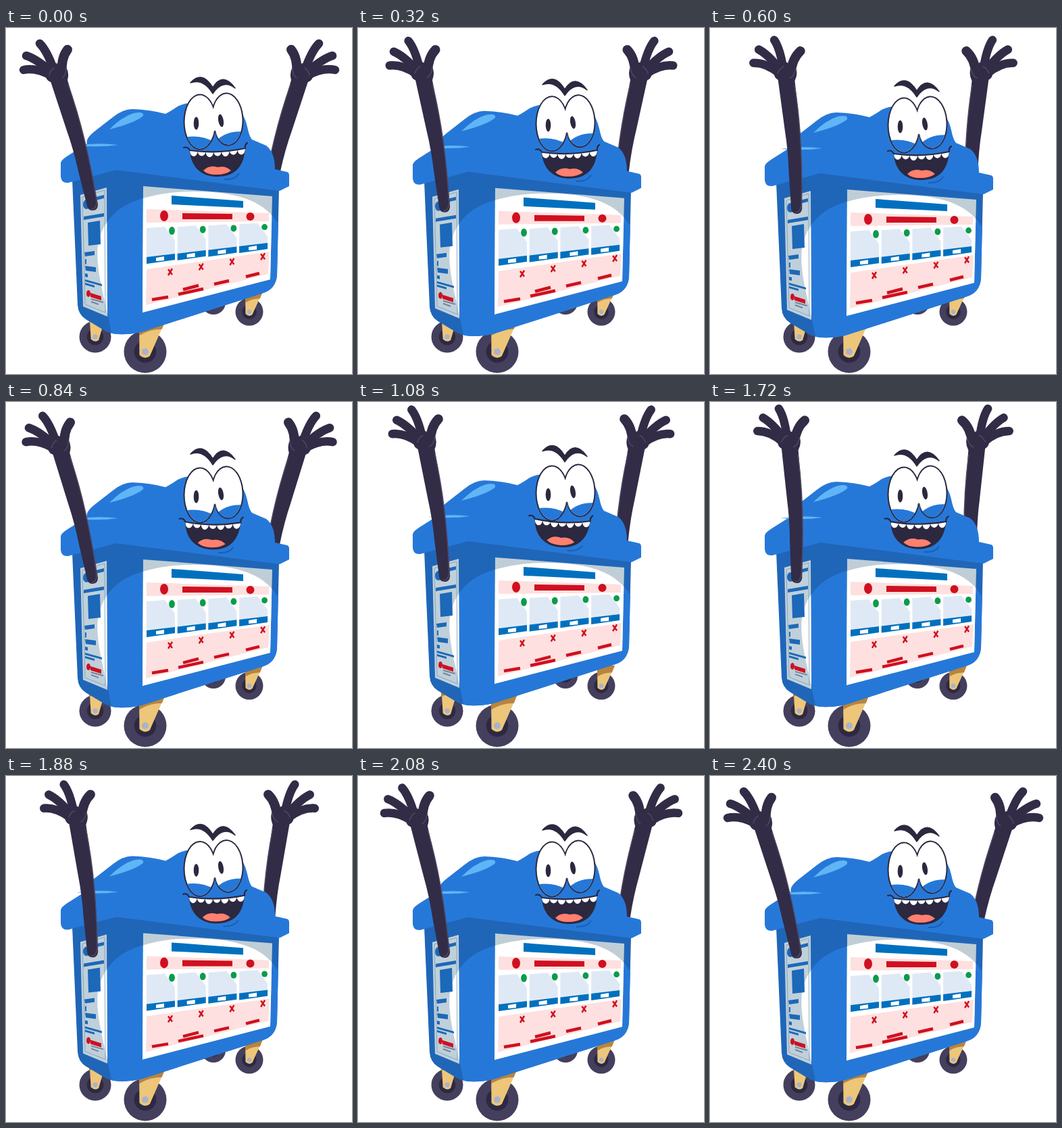
An HTML page for the animation above (2440 ms loop, 512x512 px).

```html
<!DOCTYPE html>
<html lang="en">
<head>
<meta charset="utf-8">
<style>
  html, body { margin: 0; width: 100%; height: 100%; overflow: hidden; background: #fff; }
  svg { display: block; width: 100vw; height: 100vh; }
</style>
</head>
<body>
<svg viewBox="0 0 512 512">
  <defs>
    <clipPath id="light"><path d="M158 462C150 412 129 352 137 316C144 286 165 262 203 252C226 245 250 242 278 242C340 242 386 255 405 295V462Z"/></clipPath>
    <clipPath id="eyeClip"><ellipse cx="287" cy="139" rx="22.500" ry="39.500"/><ellipse cx="327.500" cy="135" rx="22" ry="37.500" transform="rotate(-3 327 135)"/></clipPath>
    <path id="mouthShape" d="M272 181Q312 187 354 178C352 206 338 220 312 220C288 220 273 204 272 181Z"/>
    <clipPath id="mouthClip"><use href="#mouthShape"/></clipPath>
    <path id="bodyShape" d="M98 224L106 410Q107 424 118 431L148 449Q166 457 200 450L381 392Q399 386 401 366L404 238L163 205Z"/>
    <path id="frontPoster" d="M203 234L394 249L391 372L202 421Z"/>
    <path id="sidePoster" d="M110 247L149 236L150 427L114 412Z"/>

    <g id="arm">
      <path d="M120 263L107 212Q100 180 90 152L66 79L59 73Q62 55 74 52L89 58Q94 66 91 77L105 124Q122 184 136 261Q136 270 128 270Q121 270 120 263Z" fill="#322c47"/>
      <g fill="none" stroke="#322c47" stroke-width="12.500" stroke-linecap="round" stroke-linejoin="round">
        <path d="M26 62Q44 58 66 70"/>
        <path d="M30 41Q46 46 68 66"/>
        <path d="M50 23Q61 34 71 63"/>
        <path d="M91 32Q81 45 83 67" stroke-width="14"/>
        <path d="M68 71L79 65" stroke-width="18"/>
      </g>
      <path d="M92 84Q119 160 134 256Q134 268 127 268M64 70Q66 62 71 59M83 74Q89 70 89 59" fill="none" stroke="#514661" stroke-width="1.500" stroke-linecap="round"/>
    </g>
  </defs>

  <g id="wheels"></g>
  <g id="rightArm"><g transform="matrix(-1 0 0 1 513 0)"><use class="swing" href="#arm"/></g></g>

  <g id="bin">
    <use href="#bodyShape" fill="#1f66b8"/>
    <use href="#bodyShape" fill="#2678d8" clip-path="url(#light)"/>

    <use href="#sidePoster" fill="#bfd0da"/>
    <use href="#sidePoster" fill="#fff" clip-path="url(#light)"/>
    <path d="M113 250L146 240L147 421L117 409Z" fill="none" stroke="#7c9ab4" stroke-width=".8"/>
    <g fill="#1c68b9">
      <ellipse cx="119" cy="261" rx="5" ry="7"/>
      <path d="M115 279L145 274V279L115 284ZM121 288L139 285L140 320L122 322ZM133 250L145 247V252L133 255ZM116 332L131 330V336L117 338ZM117 342L119 342V350L117 349ZM117 352L133 354V361L118 359ZM117 363L121 364V369L117 368ZM117 372L142 379V382L117 375ZM117 377L131 381V384L117 380Z"/>
    </g>
    <ellipse cx="122" cy="393" rx="3" ry="5" fill="#cf1020"/>
    <path d="M125 392L141 397V403L125 398Z" fill="#cf1020"/>
    <path d="M126 401L144 406M126 405L137 409" stroke="#77839a" stroke-width="2"/>

    <use href="#frontPoster" fill="#bfced6"/>
    <use href="#frontPoster" fill="#fff" clip-path="url(#light)"/>
    <path d="M245 248L351 256V266L245 261Z" fill="#0070be"/>
    <path d="M208 268L389 274V286L208 288ZM208 357L390 331L388 364L207 410Z" fill="#fde0df"/>
    <g fill="#cf1020">
      <ellipse cx="234" cy="278" rx="6" ry="8"/>
      <path d="M261 274L335 275V283L261 283Z"/>
      <circle cx="361.500" cy="279" r="6"/>
    </g>
    <g id="cards"></g>
    <path d="M216 402L240 398M262 387L285 381M255 394L292 386M308 379L330 374M355 368L375 363" stroke="#cf1020" stroke-width="4.500"/>

    <path d="M81 200Q81 196 90 190L120 171Q117 164 131 153L158 132Q173 120 187 120Q214 121 236 127Q244 123 254 116Q266 110 282 111L342 118Q353 128 357 146Q360 161 364 165L385 174Q398 184 398 209L416 213Q419 214 419 218V234L405 241L163 210L92 229Q82 230 81 220Z" fill="#2678d8"/>
    <path d="M153 150Q172 131 189 126Q205 123 203 130Q192 140 153 150ZM104 174Q135 169 166 173Q138 177 104 174Z" fill="#60b5f7"/>

    <g id="brows"><path d="M273 81Q290 62 306 88Q321 64 339 89Q321 75 306 97Q292 74 273 81Z" fill="#2b2840" stroke="#2b2840" stroke-width="1.500" stroke-linejoin="round"/></g>
    <g id="eyes">
      <g fill="#2b2840">
        <ellipse cx="287" cy="139" rx="24.500" ry="41.500"/>
        <ellipse cx="327.500" cy="135" rx="24" ry="39.500" transform="rotate(-3 327 135)"/>
      </g>
      <path d="M297 181Q307 168 309 155Q312 167 323 176Q310 186 297 181Z" fill="#2678d8"/>
      <g clip-path="url(#eyeClip)">
        <path d="M260 90H355V185H260Z" fill="#fff"/>
        <path d="M260 163Q285 156 309 169Q326 150 355 154V185H260Z" fill="#2678d8"/>
        <path d="M299 174Q308 164 309 152Q311 164 320 172" fill="#2678d8" stroke="#2b2840" stroke-width="2.200"/>
      </g>
      <g fill="#2b2840">
        <ellipse cx="281.500" cy="141" rx="3.800" ry="9.500"/>
        <ellipse cx="318" cy="137" rx="3.800" ry="9.500" transform="rotate(-10 318 137)"/>
      </g>
    </g>
    <g id="mouth">
      <path d="M323 224Q339 225 345 215" fill="none" stroke="#1a5fb1" stroke-width="2"/>
      <use href="#mouthShape" fill="#2b2840"/>
      <g clip-path="url(#mouthClip)">
        <path d="M292 211Q301 202 313 206Q325 203 333 211Q325 217 311 217Q298 217 292 211Z" fill="#ff806f"/>
        <g id="teeth" fill="#fff"></g>
      </g>
      <path d="M263 177Q269 175 272 181Q312 187 354 178Q353 173 357 170" fill="none" stroke="#2b2840" stroke-width="2.200" stroke-linecap="round"/>
    </g>
  </g>
  <g id="leftArm"><use class="swing" href="#arm"/></g>
</svg>

<script>
const LOOP = 2440, STEP = 40;
const $ = id => document.getElementById(id);
const smooth = u => (1 - Math.cos(Math.PI * u)) / 2;
const ramp = u => u;

// Wheels: centre, radius and the top edge of the fork
const wheel = (x, y, r, fork = "") => `
  <circle cx="${x}" cy="${y}" r="${r}" fill="#443f5c"/>
  <circle cx="${x}" cy="${y}" r="${r * 0.52}" fill="#2d2942"/>${fork}`;
const fork = (x, y, r, left, right, top) => wheel(x, y, r, `
  <path d="M${left} ${top}H${right}L${x + r * 0.22} ${y + r * 0.2}Q${x} ${y + r * 0.4} ${x - r * 0.27} ${y + r * 0.15}Z" fill="#edc67a"/>
  <path d="M${left} ${top}H${right}L${right - r * 0.2} ${top + r * 0.5}Q${left + r * 0.5} ${top + r * 0.5} ${left} ${top + r * 0.8}Z" fill="#b8843e"/>
  <circle cx="${x}" cy="${y}" r="${r * 0.16}" fill="#a9b4cc"/>`);
$("wheels").innerHTML = wheel(307, 406, 18)
  + fork(132, 457, 23.5, 123, 150, 418)
  + fork(360, 420, 20.5, 354, 380, 390)
  + fork(206, 479, 31.5, 197, 237, 430);

// Four product cards that shrink towards the right
$("cards").innerHTML = [0, 1, 2, 3].map(i => {
  const x = 208 + i * 45.7, top = 296 - i * 1.8, base = 349 - i * 5.3, crossY = 361 - i * 7.6;
  return `<g transform="translate(${x} 0)">
    <path d="M0 ${top}L27 ${top - 2}L42 ${top + 18}V${base - 6}L0 ${base}Z" fill="#dfe9f6"/>
    <path d="M0 ${base - 10}L42 ${base - 15}V${base - 6}L0 ${base}Z" fill="#0070be"/>
    <path d="M14 ${base - 9}L26 ${base - 11}V${base - 5}L14 ${base - 4}Z" fill="#fff"/>
    <ellipse cx="37.500" cy="${top + 4}" rx="4.400" ry="${6 - i * 0.5}" fill="#0a9b4b"/>
    <path d="M32 ${crossY - 4}L38 ${crossY + 4}M38 ${crossY - 5}L32 ${crossY + 5}" stroke="#cf1020" stroke-width="2.500"/>
  </g>`;
}).join("");

$("teeth").innerHTML = [0, 1, 2, 3, 4, 5, 6].map(i => {
  const u = (i + 0.5) / 7;
  return `<ellipse cx="${272 + 82 * u}" cy="${181 + 12 * u * (1 - u) - 3 * u}" rx="5.800" ry="${i % 2 ? 7 : 8.5}"/>`;
}).join("");

function track(time, keys, ease = smooth) {
  const next = keys.findIndex(([at]) => at > time);
  if (next < 0) return keys[keys.length - 1][1];
  const [t0, a] = keys[next - 1], [t1, b] = keys[next];
  return a + (b - a) * ease((time - t0) / (t1 - t0));
}

const swingKeys = [[0, 0], [600, 10.5], [800, 0], [1000, 10.5], [1200, 0], [1400, 15.7], [2400, 0]];
const bobKeys = [[0, 0], [600, 5], [1000, -4.3], [2400, 0]];
const mouthKeys = [[0, 0], [600, 0], [1000, 1], [1400, 1], [2000, 0]];
const browKeys = [[0, 0], [600, 0], [1000, -4.5], [1700, 0]];

const place = (id, value) => $(id).setAttribute("transform", value);

function draw(now) {
  const time = Math.floor((now % LOOP) / STEP) * STEP;
  const bob = `translate(0 ${track(time, bobKeys, time < 1000 ? smooth : ramp)})`;
  const turn = `rotate(${track(time, swingKeys)} 128 263)`;
  const shift = track(time, mouthKeys);
  ["bin", "leftArm", "rightArm"].forEach(id => place(id, bob));
  document.querySelectorAll(".swing").forEach(arm => arm.setAttribute("transform", turn));
  place("mouth", `translate(${-11 * shift} ${-shift}) rotate(${4.5 * shift} 312 190)`);
  place("brows", `translate(0 ${track(time, browKeys)})`);
}

const start = performance.now();
function tick() {
  draw(performance.now() - start);
  requestAnimationFrame(tick);
}
tick();
</script>
</body>
</html>
```
